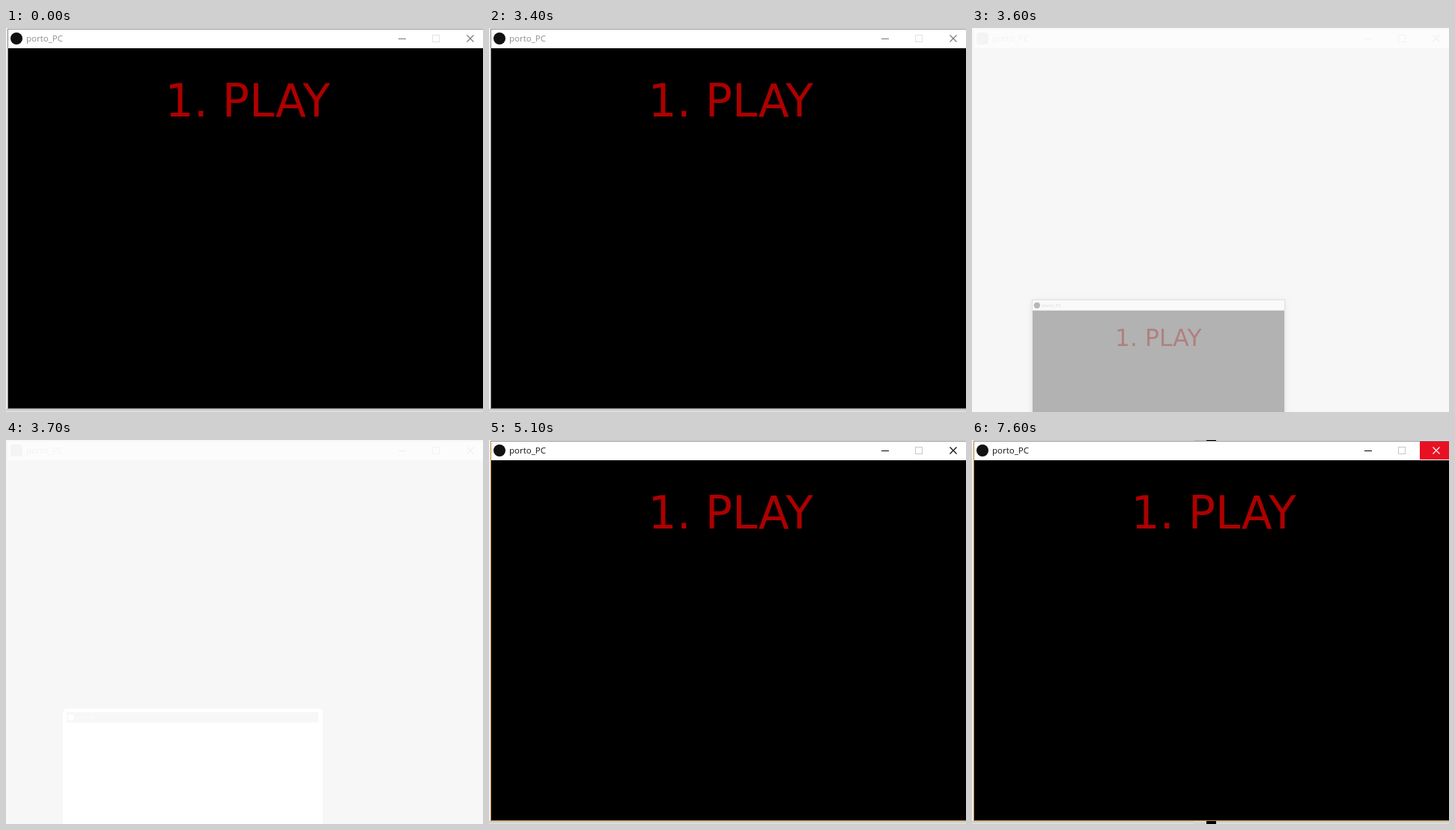
Animation, 637 px wide and 512 px high, one loop 8 s. Source, as an HTML page with a canvas:

```html
<!DOCTYPE html>
<html lang="en">
<head>
<meta charset="utf-8">
<title>Window</title>
<style>
html, body { margin: 0; width: 100%; height: 100%; overflow: hidden; background: #f7f7f7; }
canvas { display: block; }
</style>
</head>
<body>
<canvas id="stage" width="637" height="512"></canvas>
<script>
const W = 637, H = 512, LOOP = 8000;
const WIN = { w: 640, h: 506, bar: 26 };
const ctx = document.getElementById('stage').getContext('2d');

const IDLE = { text: '#948c90', button: '#777', box: '#e2e2e2', edge: '#8c8c8c' };
const ACTIVE = { text: '#111', button: '#000', box: '#c8c8c8', edge: '#bd8a35' };

function rect(x, y, w, h, color) {
  ctx.fillStyle = color;
  ctx.fillRect(x, y, w, h);
}

function label(text, x, y, font, color) {
  ctx.font = font;
  ctx.fillStyle = color;
  ctx.fillText(text, x, y);
}

function title(color) {
  label('porto_PC', 24, 17, '11.5px "Open Sans", "Noto Sans", sans-serif', color);
}

function cross(color) {
  ctx.strokeStyle = color;
  ctx.lineWidth = 1.1;
  ctx.beginPath();
  ctx.moveTo(612.5, 8.5);
  ctx.lineTo(621.5, 17.5);
  ctx.moveTo(621.5, 8.5);
  ctx.lineTo(612.5, 17.5);
  ctx.stroke();
}

function buttons(look, hover) {
  rect(521, 13, 10, 1, look.button);
  ctx.strokeStyle = look.box;
  ctx.lineWidth = 1;
  ctx.strokeRect(566.5, 8.5, 9, 9);
  if (hover) rect(595, 1, 45, 24, '#e81123');
  cross(hover ? '#fff' : look.button);
}

// Local coordinates start at the window's upper left corner.
function windowParts(look, { controls = true, hover = false } = {}) {
  rect(0, 0, WIN.w, WIN.bar, '#fff');
  rect(0, WIN.bar, WIN.w, WIN.h - WIN.bar, '#000');
  ctx.fillStyle = '#111';
  ctx.beginPath();
  ctx.arc(11, 13, 8, 0, Math.PI * 2);
  ctx.fill();
  title(look.text);
  if (controls) buttons(look, hover);
  label('1. PLAY', 209.5, 117, '60px "DejaVu Sans", sans-serif', '#ad0000');
}

function backdrop(strip) {
  rect(0, 0, W, H, '#fff');
  rect(0, 0, 2, H, '#ececec');
  const fade = ctx.createLinearGradient(0, 508, 0, H);
  fade.addColorStop(0, '#c4c4c4');
  fade.addColorStop(1, '#e4e4e4');
  rect(0, 508, W, 4, fade);
  rect(0, 0, W, 1, '#f0f0f0');
  if (strip) {
    for (const [y, h] of [[0, 1], [508, 4]]) {
      rect(297, y, 16, h, '#d5d5d5');
      rect(313, y, 13, h, '#000');
    }
  }
}

function full(look, { strip = false, hover = false } = {}) {
  backdrop(strip);
  rect(2, 1, W, 507, look.edge);
  rect(2, 1, W, 1, '#858585');
  ctx.save();
  ctx.translate(3, 1);
  windowParts(look, { hover });
  rect(0, 0, WIN.w, 1, '#858585');
  ctx.restore();
}

function desktop() {
  rect(0, 0, W, H, '#f7f7f7');
  rect(3, 2, W, 25, '#fcfcfc');
  ctx.save();
  ctx.translate(3, 1);
  ctx.fillStyle = '#f4f4f4';
  ctx.beginPath();
  ctx.roundRect(3, 5, 16, 16, 4);
  ctx.fill();
  title('#f2f2f2');
  buttons({ button: '#f0f0f0', box: '#f3f3f3' });
  ctx.restore();
}

function floating({ x, y, scale, alpha, look, controls, blur, edge }) {
  const w = WIN.w * scale, h = WIN.h * scale;
  desktop();
  ctx.save();
  ctx.shadowColor = `rgba(0,0,0,${alpha * 0.45})`;
  ctx.shadowBlur = blur;
  ctx.shadowOffsetY = 1;
  rect(x, y, w, h, '#f7f7f7');
  ctx.restore();
  ctx.save();
  ctx.translate(x, y);
  ctx.scale(scale, scale);
  // Each part fades over the same pale base.
  ctx.globalAlpha = alpha;
  windowParts(look, { controls });
  rect(0, 0, WIN.w, WIN.bar, 'rgba(247,247,247,0)');
  ctx.restore();
  ctx.strokeStyle = edge;
  ctx.lineWidth = 1;
  ctx.strokeRect(x - 0.5, y - 0.5, w + 1, h + 1);
}

function minimized() {
  desktop();
  ctx.fillStyle = '#fff';
  ctx.beginPath();
  ctx.roundRect(76, 358, 347, 180, 6);
  ctx.fill();
  ctx.save();
  ctx.translate(81, 363);
  ctx.scale(0.525, 0.525);
  rect(0, 0, WIN.w, WIN.bar, '#f7f7f7');
  ctx.fillStyle = '#fff';
  ctx.beginPath();
  ctx.roundRect(3, 5, 16, 16, 4);
  ctx.fill();
  title('#fff');
  ctx.restore();
}

const shrink = { x: 23, y: 94.5, scale: 0.879, alpha: 0.76, look: IDLE, controls: false, blur: 8, edge: '#bcbcbc' };
const vanish = { x: 81, y: 363, scale: 0.525, alpha: 0.28, look: IDLE, controls: false, blur: 6, edge: '#e2e2e2' };
const restore = { x: 11, y: 39.5, scale: 0.96, alpha: 0.79, look: ACTIVE, controls: true, blur: 18, edge: '#cbab66' };

const scenes = [
  [0, () => full(IDLE)],
  [500, () => full(ACTIVE)],
  [3400, () => full(IDLE)],
  [3500, () => floating(shrink)],
  [3600, () => floating(vanish)],
  [3700, minimized],
  [5000, () => floating(restore)],
  [5100, () => full(ACTIVE)],
  [7000, () => full(ACTIVE, { strip: true })],
  [7600, () => full(ACTIVE, { strip: true, hover: true })]
];

function draw(now) {
  const t = now % LOOP;
  scenes.findLast(([start]) => start <= t)[1]();
}

function tick() {
  draw(performance.now());
  requestAnimationFrame(tick);
}
tick();
</script>
</body>
</html>
```
